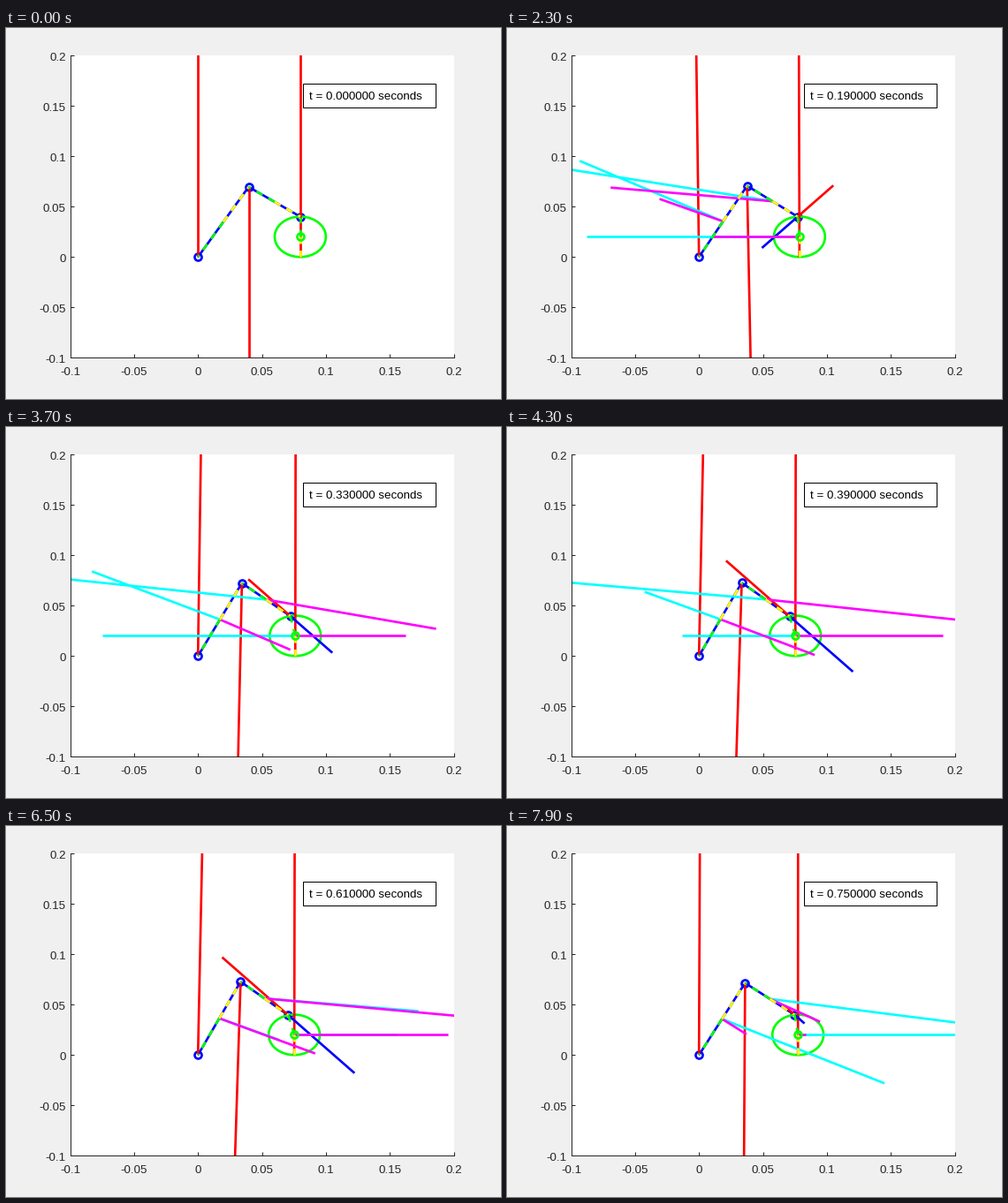
Animation, 560 px wide and 420 px high, one loop 8000 ms. Source, as a matplotlib script:

```python
import numpy as np
import matplotlib.pyplot as plt
from matplotlib.animation import FuncAnimation
from matplotlib.patches import Rectangle
from matplotlib.transforms import ScaledTranslation

W, H, DPI = 560, 420, 100
PX = 72 / DPI                     # points per pixel
LW = 2.67 * PX
DT, STEPS, HOLD = 0.01, 76, 4
L1, L2, R = 0.08, 0.05, 0.02      # two links and the wheel
M1, M2, MW, G = 1.0, 1.0, 0.5, 9.81
TURN, SLOPE = 0.25, 1.11
RED, BLUE, GREEN = "#ff0000", "#0000ff", "#00ff00"
CYAN, MAGENTA, YELLOW = "#00ffff", "#ff00ff", "#ffff00"


def poly345(u):
    """Smooth step with its first and second derivative."""
    return (10 * u**3 - 15 * u**4 + 6 * u**5,
            30 * u**2 - 60 * u**3 + 30 * u**4,
            60 * u - 180 * u**2 + 120 * u**3)


def wheel_turn(t):
    if t < 0.505:
        T = 0.5
        s, v, a = poly345(min(t / T, 1))
        return TURN * s, TURN * v / T, TURN * a / T**2
    T = 0.49
    s, v, a = poly345(max(t - 0.51, 0) / T)
    return TURN * (1 - s), -TURN * v / T, -TURN * a / T**2


def back_diff(p):
    """Backward difference, zero at the start."""
    return np.diff(p, axis=0, prepend=p[:1]) / DT


def vec(x, y):
    return np.stack([x, y], axis=-1)


time = np.arange(STEPS) * DT
theta, omega, alpha = np.array([wheel_turn(t) for t in time]).T
zero = np.zeros(STEPS)

# Pose
A = vec(zero, zero)
O = vec(0.08 - R * theta, zero + R)
C = O + R * vec(-np.sin(theta), np.cos(theta))
ground = O - [0, R]
dist = np.hypot(C[:, 0], C[:, 1])
along = (L1**2 - L2**2 + dist**2) / (2 * dist)
side = np.sqrt(L1**2 - along**2)
ux, uy = C[:, 0] / dist, C[:, 1] / dist
B = vec(along * ux - side * uy, along * uy + side * ux)
G1, G2 = (A + B) / 2, (B + C) / 2

# Velocities and accelerations
v1, v2 = back_diff(G1), back_diff(G2)
a1, a2 = back_diff(v1), back_diff(v2)
vw, aw = vec(-R * omega, zero), vec(-R * alpha, zero)
roll = back_diff(back_diff(O))[:, 0]

# Forces at the joints and at the ground
fx = 1.5 * MW * roll / (1 + np.cos(theta) - SLOPE * np.sign(roll) * np.sin(theta))
FC = vec(fx, -SLOPE * np.abs(fx))
weight = np.array([0, G])
FB = -(M2 * (a2 + weight) + FC)
FA = M1 * (a1 + weight) - FB
FN = vec(MW * roll - fx, MW * G - FC[:, 1])

# Stage
plt.rcParams["font.family"] = "Liberation Sans"
fig = plt.figure(figsize=(W / DPI, H / DPI), dpi=DPI, facecolor="#f0f0f0")
left, right, top, bottom = 72.53, 506.5, 31.0, 373.3
ax = fig.add_axes([left / W, 1 - bottom / H, (right - left) / W, (bottom - top) / H])
ax.set_xlim(-0.1, 0.2)
ax.set_ylim(-0.1, 0.2)
ticks = np.arange(-2, 5) * 0.05
names = [f"{v:.2f}".rstrip("0").rstrip(".") for v in ticks + 1e-9]
ax.set_xticks(ticks, names)
ax.set_yticks(ticks, names)
ax.tick_params(direction="in", length=4.3 * PX, width=PX, color="#262626",
               labelcolor="#262626", labelsize=13.33 * PX)
ax.tick_params(axis="x", pad=10.5 * PX)
ax.tick_params(axis="y", pad=4.7 * PX)
drop = ScaledTranslation(0, -1.5 / DPI, fig.dpi_scale_trans)
for label in ax.get_yticklabels():
    label.set_transform(label.get_transform() + drop)
for name, spine in ax.spines.items():
    spine.set_visible(name in ("left", "bottom"))
    spine.set_color("#262626")
    spine.set_linewidth(PX)


def line(color, z, **style):
    return ax.plot([], [], color=color, lw=LW, zorder=z,
                   solid_capstyle="butt", dash_capstyle="butt", **style)[0]


def ring(color, z):
    return line(color, z, ls="none", marker="o", ms=8 * PX,
                mfc="none", mec=color, mew=LW)


segments = []


def segment(start, end, color, z, **style):
    segments.append((line(color, z, **style), start, end))


def arrow(start, force, color, z, scale=1):
    segment(start, start + scale * force, color, z)


segment(A, B, BLUE, 2)
segment(B, C, BLUE, 2)
joints = ring(BLUE, 2.1)
rim = line(GREEN, 2.2)
hub = ring(GREEN, 2.8)

for p, f in ((A, FA), (B, FB), (ground, FN), (C, -FC)):
    arrow(p, f, RED, 2.3)
arrow(C, FC, BLUE, 2.4)
for p, v, a in ((G1, v1, a1), (G2, v2, a2), (O, vw, aw)):
    arrow(p, v, CYAN, 2.5, 10)
    arrow(p, a, MAGENTA, 2.6)

dash = (0, (3, 2.8))
for p, first, second in ((G1, A, B), (G2, B, C), (O, C, ground)):
    segment(p, first, GREEN, 2.7, ls=dash)
    segment(p, second, YELLOW, 2.7, ls=dash)

fig.add_artist(Rectangle((336 / W, 1 - 90 / H), 150 / W, 27 / H,
                         transform=fig.transFigure, fc="white", ec="black", lw=PX))
clock = fig.text(343 / W, 1 - 81 / H, "", fontsize=13.33 * PX, color="black",
                 va="baseline", zorder=5)
turn = np.linspace(0, 2 * np.pi, 121)


def draw(frame):
    i = max(0, frame - HOLD)
    for art, start, end in segments:
        art.set_data([start[i, 0], end[i, 0]], [start[i, 1], end[i, 1]])
    joints.set_data(*np.array([A[i], B[i], C[i]]).T)
    rim.set_data(O[i, 0] + R * np.cos(turn), O[i, 1] + R * np.sin(turn))
    hub.set_data([O[i, 0]], [O[i, 1]])
    clock.set_text(f"t = {time[i]:.6f} seconds")
    return []


anim = FuncAnimation(fig, draw, frames=STEPS + HOLD, init_func=lambda: draw(0),
                     interval=100, repeat=True, repeat_delay=0)
plt.show()
```
